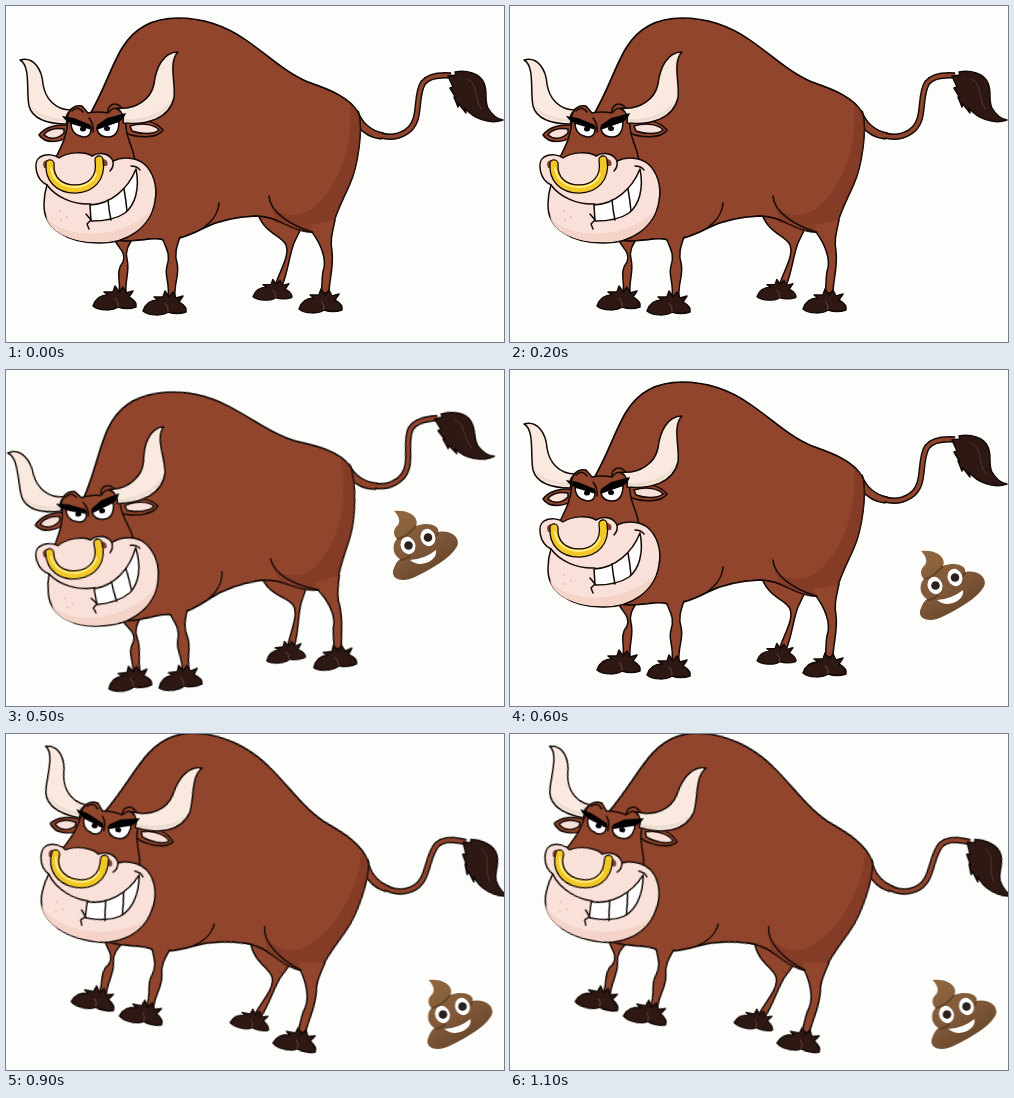
An HTML page that plays this animation: 498x336 px, repeating every 1200 ms.

```html
<!DOCTYPE html>
<html lang="en">
<head>
<meta charset="utf-8">
<title>Bull</title>
<style>
  html, body { margin: 0; width: 100%; height: 100%; overflow: hidden; background: #fdfefb; }
  svg { display: block; width: 498px; height: 336px; }
  .line { stroke: #120806; stroke-width: 1.5; stroke-linejoin: round; stroke-linecap: round; }
  .ink { fill: none; }
  .hide { fill: #90452c; }
  .dark { fill: #2e1814; }
  .horn { fill: #f9e9df; }
  .skin { fill: #f9e1d9; }
  .bull { animation: rock 1.2s step-end infinite; }
  .pile { animation: drop 1.2s step-end infinite; }
  @keyframes rock {
    0%, 50% { transform: none; }
    25% { transform: translate(-18.5px, 31px) rotate(-6.7deg); }
    75% { transform: translate(36px, -43.4px) rotate(10.8deg); }
  }
  @keyframes drop {
    0% { visibility: hidden; transform: none; }
    25% { visibility: visible; transform: translate(-23px, -40px); }
    50% { visibility: visible; transform: none; }
    75% { visibility: visible; transform: translate(11.5px, 65px); }
  }
</style>
</head>
<body>
<svg viewBox="0 0 498 336">
  <defs>
    <linearGradient id="brown" x1="0" y1="0" x2=".6" y2="1">
      <stop offset="0" stop-color="#92693f"/>
      <stop offset=".55" stop-color="#80583a"/>
      <stop offset="1" stop-color="#674629"/>
    </linearGradient>
    <path id="trunk" d="M84 108C98 84 106 58 116 42C128 22 146 12 172 12C198 12 220 20 240 34C262 49 280 67 302 76C322 83 345 91 353 108C357 124 352 160 344 178C338 192 331 204 327 219C318 227 306 228 293 224C279 220 268 210 250 210C226 211 212 215 198 222C185 229 174 233 160 235C146 229 134 238 108 234L90 170Z"/>
    <clipPath id="trunkClip"><use href="#trunk"/></clipPath>
    <g id="hoof">
      <path class="dark line" d="M0 17C2 11 7 6 15 6L11 3L20 3L22-3L26 3L30-2L33 4L40 2L36 8C41 11 44 15 43 18C37 20 31 20 25 18C20 22 6 22 0 17Z"/>
      <path class="ink" stroke="#6b4740" d="M25 18Q26 13 22 9"/>
    </g>
  </defs>

  <g class="bull">
    <!-- tail -->
    <path class="ink" stroke="#120806" stroke-width="6.4" d="M352 112C362 129 384 136 400 126C417 115 408 92 417 77Q424 68 445 69.500"/>
    <path class="hide line" d="M352 105C356 118 366 125 377 127L375 133C364 132 356 126 350 119Z"/>
    <path class="ink" stroke="#90452c" stroke-width="3.6" d="M352 112C362 129 384 136 400 126C417 115 408 92 417 77Q424 68 445 69.500"/>
    <path class="dark line" d="M442 70L450 69L449 66C460 64 474 67 478 77C482 87 478 94 482 102C486 109 491 113 497 114C483 119 467 112 459 102L460 107L453 98L452 101L448 91L450 92L444 82L447 81Z"/>
    <path class="ink" stroke="#553530" d="M461 73C473 78 467 92 476 104"/>

    <!-- legs behind -->
    <path class="hide line" d="M250 202C256 228 276 229 280 239C284 250 274 264 269 280H276C282 266 283 250 288 237L300 212Z"/>
    <use href="#hoof" transform="translate(247 276) scale(.9 .87)"/>
    <path class="hide line" d="M107 230C110 241 121 245 117 256C109 266 115 274 113 286H120C119 274 124 264 121 253C119 245 122 240 127 232Z"/>
    <use href="#hoof" transform="translate(87 283)"/>

    <use href="#trunk" class="hide line"/>
    <g clip-path="url(#trunkClip)">
      <path fill="#843c27" d="M344 99C348 151 326 188 306 203C292 212 279 211 264 200L280 234L350 223L370 110Z"/>
      <use href="#trunk" class="ink line"/>
    </g>

    <!-- legs in front -->
    <path class="hide" d="M303 219C314 236 320 252 318 262C315 270 317 277 315 287H323C323 275 328 260 326 245C324 235 326 228 329 214Z"/>
    <path class="ink line" d="M306 226C315 238 320 252 318 262C315 270 317 277 315 287H323C323 275 328 260 326 245C324 235 326 228 329 214"/>
    <use href="#hoof" transform="translate(293 286)"/>
    <path class="hide" d="M156 229C160 242 165 249 161 260C158 269 164 277 162 290H169C168 276 174 268 171 257C168 248 171 240 175 227Z"/>
    <path class="ink line" d="M157 234C160 242 165 249 161 260C158 269 164 277 162 290H169C168 276 174 268 171 257C168 248 171 240 174 231"/>
    <use href="#hoof" transform="translate(137 288)"/>
    <path class="ink line" d="M213 197C212 208 207 215 197 222M263 190C264 206 284 219 306 226"/>

    <!-- ears -->
    <path class="hide line" d="M64 120C50 117 38 122 33 129C39 138 54 137 63 130Z"/>
    <path class="skin line" d="M58 123C48 121 40 125 38 129C44 134 52 133 58 127Z"/>
    <path class="hide line" d="M116 117C133 111 150 115 157 124C151 133 131 132 120 127Z"/>
    <path class="skin line" d="M124 120C137 116 149 119 153 124C147 129 134 128 126 125Z"/>

    <!-- head -->
    <path class="hide line" d="M62 115C60 106 67 98 76 100L82 107Q92 105 102 107C101 99 109 95 115 101C121 108 119 116 120 121C121 136 129 143 129 158L104 170L46 160C53 143 60 136 62 115Z"/>
    <path class="horn line" d="M14 54C28 50 36 64 37 78C39 92 49 104 65 104Q58 109 61 118C43 118 27 114 23 100C20 86 25 60 14 54Z"/>
    <path fill="#ecdcd0" d="M24 98C28 111 43 115 60 116L60 113C44 113 30 108 24 98Z"/>
    <path class="horn line" d="M172 46C157 46 150 62 148 78C145 93 130 104 111 102Q119 108 117 117C141 119 163 113 168 92C170 78 162 56 172 46Z"/>
    <path fill="#ecdcd0" d="M166 93C160 111 140 116 118 116L118 113C139 114 157 107 166 93Z"/>
    <path class="ink line" d="M66 105Q72 99 77 106M103 106Q108 99 114 105"/>

    <path fill="#fff" class="line" d="M65 117L85 123C85 131 79 132 74 130C67 128 65 123 65 117Z"/>
    <path fill="#fff" class="line" d="M91 123L113 115C113 126 109 131 102 131C96 131 92 128 91 123Z"/>
    <ellipse cx="77" cy="123" rx="3" ry="2.500"/>
    <ellipse cx="101" cy="122.500" rx="3" ry="2.500"/>
    <path d="M56 110L68 112L85 119L86 123L65 117Q59 115 56 110ZM120 107L101 112L91 119L90 123L113 116Q118 113 120 107Z"/>
    <path class="ink line" d="M83 112Q88 118 87 126"/>

    <!-- muzzle -->
    <path class="skin line" d="M41 179C29 173 27 156 34 151C41 147 49 149 53 152C62 146 78 145 86 150C94 145 104 148 107 155C117 150 130 152 137 157C147 165 152 180 149 195C145 221 121 238 92 237C61 237 37 222 38 198Q38 188 41 179Z"/>
    <path fill="#f4d3c9" d="M40 210C56 233 113 236 146 204C138 226 115 236 92 236C65 236 43 226 40 210Z"/>
    <path class="ink line" d="M41 179C50 191 67 199 85 198M107 155Q108 161 104 165"/>
    <path fill="#fff" class="line" d="M84 199C105 198 122 183 130 163C134 183 129 199 119 207C109 214 97 215 85 215Z"/>
    <path class="ink line" d="M102 194Q103 205 105 214M118 183Q120 194 121 205M125 160Q131 160 134 164M80 208L85 214L81 218L83 223"/>
    <path fill="#7a4238" d="M38 162Q35 155 41 154Q46 156 44 161ZM96 160Q93 154 98 153Q103 155 101 160Z"/>
    <path class="ink" stroke="#120806" stroke-width="9.400" stroke-linecap="round" d="M44 158C43 173 53 183 69 183C85 183 96 172 93 154"/>
    <path class="ink" stroke="#f2c829" stroke-width="6.800" stroke-linecap="round" d="M44 158C43 173 53 183 69 183C85 183 96 172 93 154"/>
    <path class="ink" stroke="#fff08a" stroke-width="1.800" stroke-linecap="round" d="M45 162C47 175 57 181 69 181C79 181 87 176 90 168"/>
    <g fill="#ecbcb1">
      <circle cx="54" cy="205" r="1"/><circle cx="61" cy="211" r="1"/><circle cx="55" cy="214" r="1"/>
    </g>
  </g>

  <g class="pile">
    <path fill="url(#brown)" d="M411 181C424 179 437 186 433 196C446 191 457 196 455 202C470 199 479 210 473 218C467 228 450 238 434 246C419 254 406 249 411 238Q413 232 417 229C409 224 409 214 414 209C409 204 411 198 415 195C418 190 415 185 411 181Z"/>
    <path class="ink" stroke="#523519" stroke-opacity=".6" stroke-width="2" d="M414 209Q423 208 433 196M417 230Q423 230 428 225M449 208Q455 206 455 202"/>
    <g fill="#fff">
      <ellipse cx="425" cy="215.500" rx="7.300" ry="8.800" transform="rotate(-20 425 215.500)"/>
      <ellipse cx="445" cy="207.500" rx="7.300" ry="8.800" transform="rotate(-20 445 207.500)"/>
      <path d="M427 230Q442 229 453 220C455 231 437 239 427 230Z"/>
    </g>
    <g fill="#2b211e">
      <circle cx="425.500" cy="215.500" r="4.300"/><circle cx="445" cy="207.500" r="4.300"/>
    </g>
  </g>
</svg>
</body>
</html>
```
